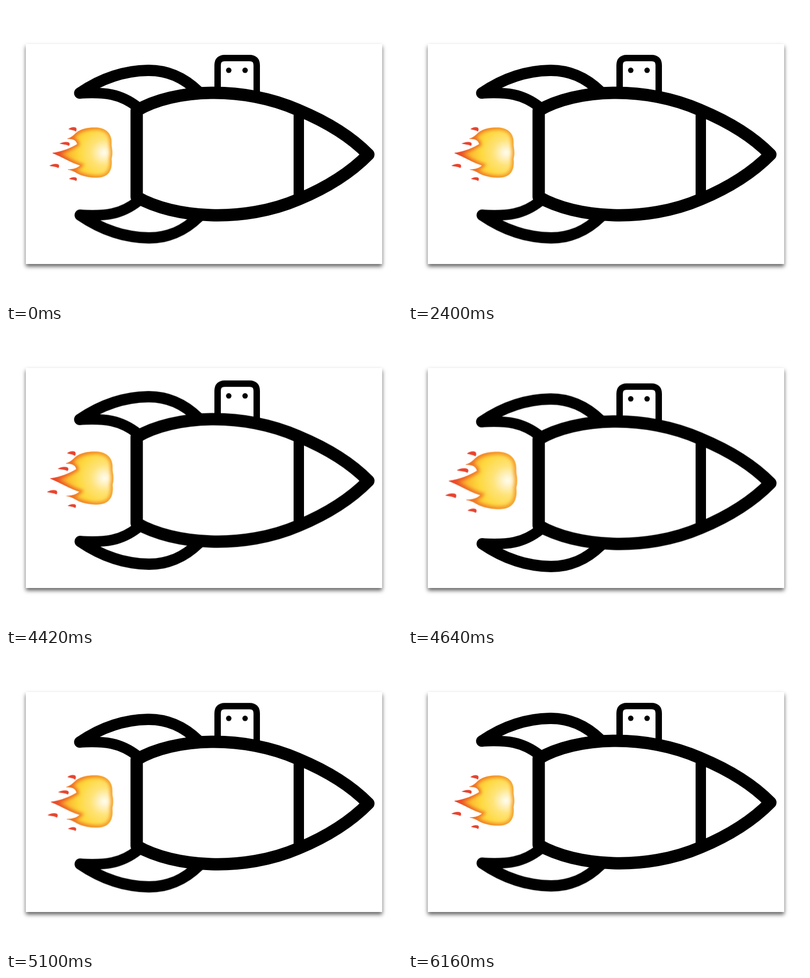
Animation, 800 px wide and 600 px high, one loop 7.2 s. Source, as an HTML page:

```html
<!DOCTYPE html>
<html lang="en">
<head>
<meta charset="utf-8">
<title>Rocket</title>
<style>
  html, body { margin: 0; width: 100%; height: 100%; overflow: hidden; background: #fff; }
  .card {
    position: absolute; left: 40px; top: 77px; width: 720px; height: 446px;
    background: #fff; box-shadow: 0 5px 8px rgba(0, 0, 0, .62);
  }
  svg { position: absolute; left: 0; top: 0; width: 800px; height: 600px; }
  .line { fill: none; stroke: #000; stroke-linecap: round; stroke-linejoin: round; }
  .rocket, .head, .flame { animation: 7200ms linear infinite; }
  .rocket { animation-name: sink; }
  .head { animation-name: nod; }
  .flame { animation-name: thrust; }
  .flame, .flicker { transform-origin: 175px 300px; }
  .flicker { animation: flicker 1200ms linear infinite; }

  @keyframes sink {
    0%, 60% { transform: none; }
    61.39% { transform: translateY(4.7px); }
    62.78% { transform: translateY(7.5px); }
    64.44% { transform: translateY(9.4px); }
    66.67% { transform: translateY(11px); }
    68.33% { transform: translateY(9px); }
    70.28% { transform: translateY(3.8px); }
    70.83% { transform: translateY(2px); }
    72.22% { transform: translateY(-1px); }
    75% { transform: translateY(-.4px); }
    79%, 100% { transform: none; }
  }
  @keyframes nod {
    0%, 60% { transform: none; }
    61.39% { transform: translateY(3.2px); }
    62.78% { transform: translateY(6.5px); }
    64.44% { transform: translateY(9.2px); }
    66.67% { transform: translateY(10.6px); }
    68.33% { transform: translateY(7.4px); }
    70.28% { transform: translateY(1.6px); }
    70.83% { transform: translateY(.2px); }
    72.22% { transform: translateY(-2px); }
    75% { transform: translateY(-.7px); }
    79%, 100% { transform: none; }
  }
  @keyframes thrust {
    0%, 60% { transform: translateY(0) scale(1); }
    61.39% { transform: translateY(3.2px) scale(1.055); }
    62.78% { transform: translateY(5.8px) scale(1.1); }
    64.44% { transform: translateY(8.3px) scale(1.143); }
    66.67% { transform: translateY(9.5px) scale(1.18); }
    68.33% { transform: translateY(7.2px) scale(1.15); }
    70.28% { transform: translateY(3px) scale(1.073); }
    70.83% { transform: translateY(2px) scale(1.042); }
    72.22% { transform: translateY(0) scale(1.01); }
    75% { transform: translateY(-.2px) scale(.996); }
    80% { transform: translateY(0) scale(1.002); }
    85.5%, 100% { transform: translateY(0) scale(1); }
  }
  @keyframes flicker {
    0%, 13.3%, 100% { transform: scale(1); }
    6.7% { transform: scale(.995); }
  }
</style>
</head>
<body>
<div class="card"></div>
<svg viewBox="0 0 800 600">
  <defs>
    <radialGradient id="glow" gradientUnits="userSpaceOnUse" cx="198" cy="297" r="105">
      <stop offset="0" stop-color="#fffdf0"/>
      <stop offset=".1" stop-color="#fff3c4"/>
      <stop offset=".25" stop-color="#ffe479"/>
      <stop offset=".48" stop-color="#fed940"/>
      <stop offset=".66" stop-color="#fcbe30"/>
      <stop offset=".82" stop-color="#f58d28"/>
      <stop offset="1" stop-color="#ea4c2a"/>
    </radialGradient>
    <linearGradient id="rim" gradientUnits="userSpaceOnUse" x1="95" y1="0" x2="215" y2="0">
      <stop offset="0" stop-color="#e8402a"/>
      <stop offset=".4" stop-color="#f07a26"/>
      <stop offset="1" stop-color="#f6a02c"/>
    </linearGradient>
    <filter id="soft" x="-20%" y="-20%" width="140%" height="140%">
      <feGaussianBlur stdDeviation="3.2"/>
    </filter>
    <path id="fire" d="M124 269 C135 266 138 259 146 254 C156 248 168 246.500 180 246.500
      C197 246.500 210 254 212.500 270 C213.500 278 212.500 281 213.500 286 Q216 299 213 310
      C215 330 209 341 197 345.500 C184 350 162 347 149 341.500 C141 338 136 333 125 331.500
      C136 331 144 329 150 323 C132 318 116 307 94 298 C114 295 131 288 144 280
      C142 272 136 269 124 269Z"/>
    <clipPath id="inside"><use href="#fire"/></clipPath>
    <path id="spark" d="M0 4 C5 0 11 -1 15 1 C17 3 17 6 15 9 C12 6 6 6 0 4Z" fill="#e8442e"/>
    <g id="fin" class="line">
      <path stroke-width="23" d="M149 176.500 C198 143 246 131 287 130.500 C327 130 359 145 388 173"/>
      <path stroke-width="21.500" d="M149 177 C200 174 232 178 266 205"/>
    </g>
  </defs>

  <g class="flame"><g class="flicker">
    <use href="#fire" fill="url(#glow)"/>
    <g clip-path="url(#inside)">
      <use href="#fire" fill="none" stroke="url(#rim)" stroke-width="9" filter="url(#soft)"/>
    </g>
    <use href="#fire" fill="none" stroke="url(#rim)" stroke-width=".6"/>
    <use href="#spark" x="126" y="245.500"/>
    <use href="#spark" transform="translate(108 275.500) scale(1.25 .9)"/>
    <use href="#spark" transform="translate(87.500 320) scale(1.2 .95)"/>
    <use href="#spark" transform="translate(127 347) scale(.98 .85)"/>
  </g></g>

  <g class="head">
    <path d="M427.500 180 V120 Q427.500 105.400 442 105.400 H492 Q506.500 105.400 506.500 120 V180"
      fill="#fff" stroke="#000" stroke-width="13"/>
    <circle cx="450" cy="130.300" r="5.500"/>
    <circle cx="483" cy="130.300" r="5.500"/>
  </g>

  <g class="rocket">
    <use href="#fin"/>
    <use href="#fin" transform="matrix(1 0 0 -1 1 600.500)"/>
    <path class="line" style="fill:#fff" stroke-width="25" d="M264 212 C340 167 480 161.500 591 211
      C646 234 694 262 732 301 C694 340 646 369 591 392 C480 440 340 431 264 387Z"/>
    <path class="line" stroke-width="21" d="M591.500 213 V388"/>
  </g>
</svg>
</body>
</html>
```
